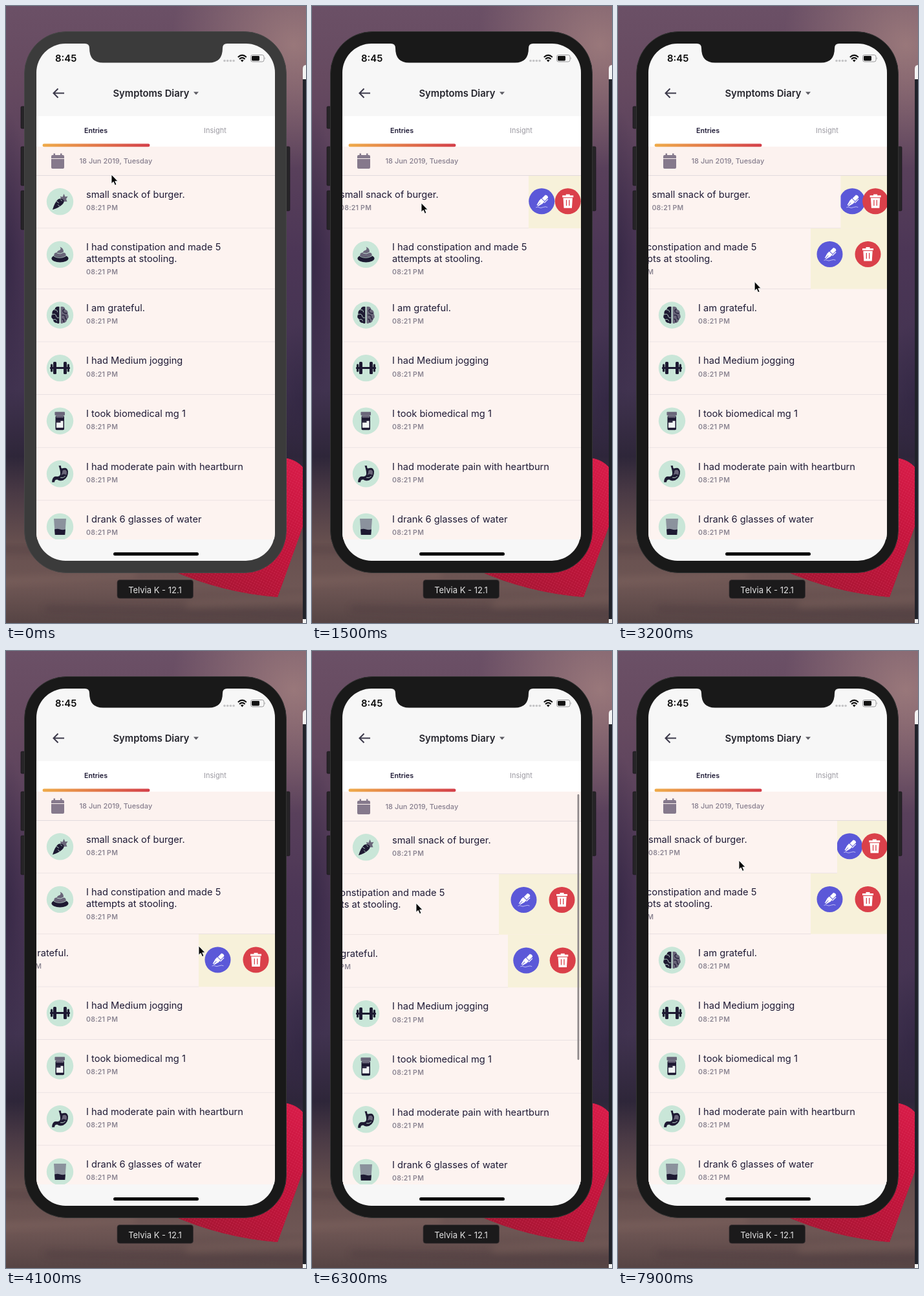
These frames come from a looping animation (464 px wide and 952 px high, 8 s). An HTML page:

```html
<!DOCTYPE html>
<html lang="en">
<head>
<meta charset="utf-8">
<title>Symptoms Diary</title>
<style>
  html, body { margin: 0; width: 100%; height: 100%; overflow: hidden; background: #4a3a50; }
  svg { display: block; width: 464px; height: 952px; }
  text { font-family: Inter, "Open Sans", sans-serif; fill: #1f1b36; }
  .entry { font-size: 14.65px; }
  .time { font-size: 10.5px; font-weight: 600; letter-spacing: .25px; fill: #8b8592; }
  .date { font-size: 11px; font-weight: 500; fill: #857d8d; }
  .title { font-size: 14.8px; font-weight: 600; fill: #24242c; }
  .tab { font-size: 10.7px; font-weight: 600; }
  .idle { font-size: 11px; font-weight: 400; fill: #9b99a1; }
  .clock { font-size: 14.9px; font-weight: 600; fill: #0b0b0b; }
  .device { font-size: 13px; fill: #e2e2e2; }
  .dark { fill: #1d1932; }
  .grey { fill: #696579; }
  .cut { fill: none; stroke: #c9e6d8; stroke-width: .9; stroke-linecap: round; }
</style>
</head>
<body>
<svg viewBox="0 0 464 952">
  <defs>
    <linearGradient id="dusk" x2="0" y2="1">
      <stop offset="0" stop-color="#6b5066"/>
      <stop offset=".12" stop-color="#664a60"/>
      <stop offset=".4" stop-color="#4c3656"/>
      <stop offset=".62" stop-color="#413350"/>
      <stop offset=".73" stop-color="#2e2639"/>
      <stop offset=".79" stop-color="#4a3a45"/>
      <stop offset=".87" stop-color="#67504f"/>
      <stop offset=".94" stop-color="#6e5654"/>
      <stop offset="1" stop-color="#564444"/>
    </linearGradient>
    <radialGradient id="glow">
      <stop offset="0" stop-color="#a58280" stop-opacity=".8"/>
      <stop offset="1" stop-color="#a58280" stop-opacity="0"/>
    </radialGradient>
    <radialGradient id="haze">
      <stop offset="0" stop-color="#2f2440" stop-opacity=".7"/>
      <stop offset="1" stop-color="#2f2440" stop-opacity="0"/>
    </radialGradient>
    <linearGradient id="cloth" x1=".2" y1="1" x2="1" y2="0">
      <stop offset="0" stop-color="#a31632"/>
      <stop offset=".55" stop-color="#c2143b"/>
      <stop offset="1" stop-color="#d91c49"/>
    </linearGradient>
    <pattern id="weave" width="4" height="4" patternUnits="userSpaceOnUse" patternTransform="rotate(28)">
      <path d="M0 1H2" stroke="#f2557a" stroke-width=".8" opacity=".5"/>
    </pattern>
    <linearGradient id="bar">
      <stop offset="0" stop-color="#efab4a"/>
      <stop offset=".5" stop-color="#e2784a"/>
      <stop offset="1" stop-color="#d43f4a"/>
    </linearGradient>
    <filter id="blur"><feGaussianBlur stdDeviation="6"/></filter>
    <clipPath id="screenClip"><rect x="47" y="58" width="369" height="798" rx="45"/></clipPath>
    <clipPath id="listClip"><rect x="47" y="217" width="369" height="606"/></clipPath>

    <g id="carrot">
      <path class="grey" d="M2-2L.5-8 4-7 6-12 8-7.500 12-8 9.500-4 11 0 5 0z"/>
      <path class="dark" d="M-11.500 12.500Q-8 1-3-3.500Q2-6 5.500-2.500Q7.500 1 3 5Q-2 9.500-11.500 12.500z"/>
      <path class="cut" d="M-5 0L-2 2M-1 7L-3 5M1-3L3-1"/>
    </g>
    <g id="swirl">
      <ellipse class="dark" cy="6" rx="13" ry="6"/>
      <path class="grey" d="M-9 2Q-10-3-5-3Q-4-6 0-7Q2-9 0-12Q7-9 5-3Q10-3 9 2Q0 6-9 2z"/>
      <path class="cut" d="M-9 3Q0 7.500 9 2.500M-4-2Q1 0 5-3"/>
    </g>
    <g id="brain">
      <path class="dark" d="M-1-13Q-7-14-8-9Q-13-7-12-2Q-15 3-11 6Q-10 12-5 12Q-2 14-1 12z"/>
      <path class="grey" d="M1-13Q7-14 8-9Q13-7 12-2Q15 3 11 6Q10 12 5 12Q2 14 1 12z"/>
      <path class="cut" d="M-8-8Q-4-9-4-5M-12-1Q-7-3-6 1T-2 4M-10 7Q-6 5-5 9"/>
      <path d="M7-9Q3-8 5-5T11-3M3 0Q8-1 8 3T11 6M3 6Q6 6 6 11" fill="none" stroke="#211c38" stroke-width="1.300"/>
    </g>
    <g id="dumbbell" class="dark">
      <rect x="-15.500" y="-1.500" width="31" height="3" rx="1.200"/>
      <rect x="-10.500" y="-9.500" width="5" height="19" rx="1.500"/>
      <rect x="5.500" y="-9.500" width="5" height="19" rx="1.500"/>
      <rect x="-14.500" y="-6" width="3.200" height="12" rx="1.300"/>
      <rect x="11.300" y="-6" width="3.200" height="12" rx="1.300"/>
    </g>
    <g id="bottle">
      <rect class="dark" x="-7" y="-8" width="13.500" height="22" rx="1.800"/>
      <rect class="grey" x="-8" y="-14" width="15.500" height="5.500" rx="1"/>
      <path class="grey" d="M-6-8.500H5.500V-5H-6z"/>
      <path d="M-5.500 0H5V10.500H-5.500z" fill="#f2f5f5"/>
      <path class="dark" d="M-5.500 0H1V2.500H-5.500z"/>
    </g>
    <g id="stomach">
      <path class="dark" d="M-2-12.500H1.500Q1.500-7 4-8.500Q11-11 12.500-4Q13 6 5 10Q-1 12-4 9Q-8 8-8.500 13H-12.500Q-12 4-6 4Q-1 5 .5 1Q1-4-2-12.500z"/>
      <path class="grey" d="M4-5Q9-8 10.500-3L10 2Q6-1 2 2Q4-2 4-5z"/>
      <path class="cut" d="M1 6Q5 7 8 4"/>
    </g>
    <g id="glass">
      <path d="M-9.500-12.500H9.500L7.700 12.500H-7.700z" fill="#8b929d"/>
      <path class="dark" d="M-8.400 4Q-4 2.500 0 4T8.400 4L7.700 12.500H-7.700z"/>
    </g>
    <g id="edit">
      <circle r="20" fill="#5b58d8"/>
      <g transform="rotate(45)" fill="#fff">
        <path d="M-3-11Q0-13.500 3-11V-3.500H-3zM-3.500-2.500H3.500V2L1.400 9.500H.4V3H-.4V9.500H-1.400L-3.500 2z"/>
        <path d="M4-9H5.200V-1H4z"/>
      </g>
      <path d="M-9 9.500Q-6 8-4 9.500T2 9.300T9 9.300" fill="none" stroke="#d6d5fa" stroke-width=".8"/>
    </g>
    <g id="bin">
      <circle r="20" fill="#da404a"/>
      <path d="M-8.500-9H-3V-10.800H3V-9H8.500V-6H-8.500zM-7.200-5H7.200L6.200 10.500H-6.200z" fill="#fff"/>
      <path d="M-2.200-2V7M2.200-2V7" stroke="#da404a" stroke-width="1.300"/>
    </g>
  </defs>

  <rect width="464" height="952" fill="url(#dusk)"/>
  <ellipse cx="445" cy="60" rx="190" ry="190" fill="url(#glow)"/>
  <ellipse cx="0" cy="390" rx="40" ry="230" fill="url(#haze)"/>
  <ellipse cx="460" cy="610" rx="60" ry="120" fill="url(#haze)"/>
  <g filter="url(#blur)" opacity=".35">
    <path d="M-20 838L260 846M60 930L480 938" stroke="#3a2c34" stroke-width="7"/>
    <path d="M-20 888L200 878M280 922L480 914" stroke="#93736a" stroke-width="8"/>
  </g>
  <path id="heart" d="M250 868Q330 905 420 912Q436 868 460 800V713Q449 699 428 697L390 770z" fill="url(#cloth)"/>
  <use href="#heart" style="fill:url(#weave)"/>
  <path d="M250 868Q330 905 420 912Q436 868 460 800V713Q449 699 428 697L390 770z" fill="url(#weave)"/>
  <path d="M464 91Q459 91 459 97V113H464z" fill="#f3f3f3"/>
  <path d="M459 113H464V946H459z" fill="#20222a"/>
  <path d="M459 946H464V952H459z" fill="#f3f3f3"/>

  <g fill="#262427" stroke="#17161a" stroke-width=".7">
    <rect x="23" y="155" width="7" height="34" rx="1.500"/>
    <rect x="23" y="217" width="7" height="60" rx="1.500"/>
    <rect x="23" y="285" width="7" height="60" rx="1.500"/>
    <rect x="432" y="217" width="7" height="99" rx="1.500"/>
  </g>
  <rect id="bezel" x="28.500" y="39.500" width="405" height="835" rx="65"/>

  <g clip-path="url(#screenClip)">
    <rect x="47" y="58" width="369" height="798" fill="#f7f7f7"/>
    <rect x="47" y="170" width="369" height="47" fill="#fff"/>
    <rect x="47" y="217" width="369" height="606" fill="#fdf3f0"/>
    <g clip-path="url(#listClip)">
      <g id="rows"></g>
      <g id="day">
        <rect x="47" y="212" width="369" height="49.500" fill="#fcf2ef"/>
        <path d="M47 261.500H416" stroke="#e2dadd"/>
        <path d="M72 230H73.500V227.500H76V230H84V227.500H86.500V230H88Q90 230 90 232V249Q90 251 88 251H72Q70 251 70 249V232Q70 230 72 230z" fill="#85798c"/>
        <path d="M70 235.500H90" stroke="#fcf2ef" stroke-width="1.200"/>
        <text class="date" x="113.500" y="243">18 Jun 2019, Tuesday</text>
      </g>
      <rect id="scroller" x="410.500" y="221" width="2.800" height="410" rx="1.400" fill="#8f898b"/>
    </g>
    <rect x="56.500" y="212.500" width="166" height="4.800" rx="2.400" fill="url(#bar)"/>
    <path d="M90 134.500H74M80.500 127.500L73.500 134.500L80.500 141.500" fill="none" stroke="#3c3a4b" stroke-width="2"/>
    <text class="title" x="165.500" y="139.500">Symptoms Diary</text>
    <path d="M290 132.500H298L294 137z" fill="#5b5a62"/>
    <text class="tab" x="139" y="195.500" text-anchor="middle">Entries</text>
    <text class="idle" x="323.500" y="195.500" text-anchor="middle">Insight</text>
    <text class="clock" x="76" y="86">8:45</text>
    <g fill="#c4c4c6">
      <circle cx="338" cy="84.500" r="1.800"/><circle cx="342.700" cy="84.500" r="1.800"/>
      <circle cx="347.400" cy="84.500" r="1.800"/><circle cx="352.100" cy="84.500" r="1.800"/>
    </g>
    <path d="M358.800 79Q365.300 72.800 371.800 79M361 82Q365.300 77.800 369.600 82" fill="none" stroke="#111" stroke-width="2"/>
    <path d="M365.300 86.500L362.900 83.800Q365.300 81.600 367.700 83.800z" fill="#111"/>
    <rect x="378.500" y="75.500" width="20.500" height="10.500" rx="2.800" fill="none" stroke="#98989a"/>
    <rect x="380" y="77" width="12" height="7.500" rx="1.400" fill="#111"/>
    <path d="M400.300 78.800Q402 80.700 400.300 82.600z" fill="#98989a"/>
    <rect x="166" y="843" width="132" height="5" rx="2.500" fill="#050505"/>
  </g>
  <path id="notch" d="M122 57H342V58Q335 58 335 65Q335 87.500 314 87.500H150Q129 87.500 129 65Q129 58 122 58z"/>

  <rect x="172" y="885.500" width="117.500" height="28.500" rx="4" fill="#1b1a1b" stroke="#3c3335" stroke-width=".7"/>
  <text class="device" x="230.500" y="906" text-anchor="middle">Telvia K - 12.1</text>

  <path id="pointer" d="M0 0V14.200L3.200 11.300L5.500 16.600L8 15.500L5.700 10.400H10z" fill="#050505" stroke="#fff" stroke-width=".9"/>
</svg>

<script>
const LOOP = 8000, STEP = 100, OPEN = 118, RIGHT = 416;
const byId = id => document.getElementById(id);

const entries = [
  ["carrot", "small snack of burger."],
  ["swirl", "I had constipation and made 5", "attempts at stooling."],
  ["brain", "I am grateful."],
  ["dumbbell", "I had Medium jogging"],
  ["bottle", "I took biomedical mg 1"],
  ["stomach", "I had moderate pain with heartburn"],
  ["glass", "I drank 6 glasses of water"]
];

// Each track lists [time, value, ...] keys, eased between neighbours.
const swipes = [
  [[1200, 0], [1700, -125], [1900, -118], [3050, -118], [3400, 0], [7500, 0], [7900, -77]],
  [[2700, 0], [3050, -118], [3750, -118], [4100, 0], [4980, 0], [5700, -127], [6300, -127], [6600, -118]],
  [[3400, 0], [3750, -118], [6200, -118], [6300, -113], [6700, 0]]
];
const pointerPath = [
  [0, 163, 260], [1000, 248, 308], [1200, 250, 307], [1700, 125, 302], [1950, 140, 320],
  [2500, 276, 403], [2700, 278, 400], [3050, 160, 395], [3400, 290, 472], [3750, 172, 464],
  [4100, 298, 455], [4800, 298, 455], [4980, 232, 388], [5700, 105, 386], [6100, 105, 386],
  [6300, 161, 389], [7500, 264, 320], [7900, 187, 323]
];
const scrollPath = [[5000, 0], [5300, -1], [5700, -1], [6200, 1], [6400, 1], [6800, 0]];
const scrollerFade = [[5000, 0], [5150, 1], [6700, 1], [7000, 0]];

function at(track, t, i = 1) {
  const n = track.findIndex(key => key[0] > t);
  if (n === 0) return track[0][i];
  if (n < 0) return track[track.length - 1][i];
  const a = track[n - 1], b = track[n];
  const u = (t - a[0]) / (b[0] - a[0]);
  return a[i] + (b[i] - a[i]) * u * u * (3 - 2 * u);
}

function rowMarkup([icon, ...lines], top) {
  const height = 63.6 + 18 * lines.length - (lines.length > 1 ? 6 : 0);
  const words = lines.map((s, i) => `<text class="entry" x="124" y="${34 + 18 * i}">${s}</text>`).join("");
  return { height, html: `<g transform="translate(0 ${top})">
    <g class="back"><rect x="47" width="369" height="${height}" fill="#f7f1da"/>
      <use class="pen" href="#edit" y="39.700"/><use class="trash" href="#bin" y="39.700"/></g>
    <g class="front"><rect x="47" width="369" height="${height}" fill="#fdf3f0"/>
      <path d="M47 ${height - .2}H416" stroke="#e2dadd"/>
      <circle cx="83.500" cy="40.200" r="20.700" fill="#c9e6d8"/>
      <use href="#${icon}" x="83.500" y="40.200"/>${words}
      <text class="time" x="124" y="${35.2 + 18 * lines.length}">08:21 PM</text></g></g>` };
}

let top_ = 261.6, markup = "";
for (const entry of entries) {
  const row = rowMarkup(entry, top_);
  markup += row.html;
  top_ += row.height;
}
byId("rows").innerHTML = markup;

const rows = [...byId("rows").children].map(g => ({
  back: g.querySelector(".back"), front: g.querySelector(".front"),
  pen: g.querySelector(".pen"), trash: g.querySelector(".trash")
}));
const move = (el, x, y) => el.setAttribute("transform", `translate(${x} ${y})`);

function draw(t) {
  rows.forEach((row, i) => {
    const x = swipes[i] ? at(swipes[i], t) : 0;
    const shown = Math.min(-x, OPEN);
    row.back.setAttribute("visibility", x < 0 ? "visible" : "hidden");
    move(row.front, x, 0);
    row.pen.setAttribute("x", RIGHT - .75 * shown);
    row.trash.setAttribute("x", RIGHT - .25 * shown);
  });

  const scroll = at(scrollPath, t);
  move(byId("rows"), 0, scroll);
  move(byId("day"), 0, Math.max(0, scroll));
  byId("scroller").setAttribute("opacity", at(scrollerFade, t));

  const focused = t >= 1200;
  const shell = focused ? "#191919" : "#3b3b3b";
  byId("bezel").setAttribute("fill", shell);
  byId("bezel").setAttribute("stroke", focused ? "#343434" : "#474747");
  byId("notch").setAttribute("fill", shell);
  move(byId("pointer"), at(pointerPath, t), at(pointerPath, t, 2));
}

function tick() {
  draw(Math.floor(performance.now() % LOOP / STEP) * STEP);
  requestAnimationFrame(tick);
}
tick();
</script>
</body>
</html>
```
